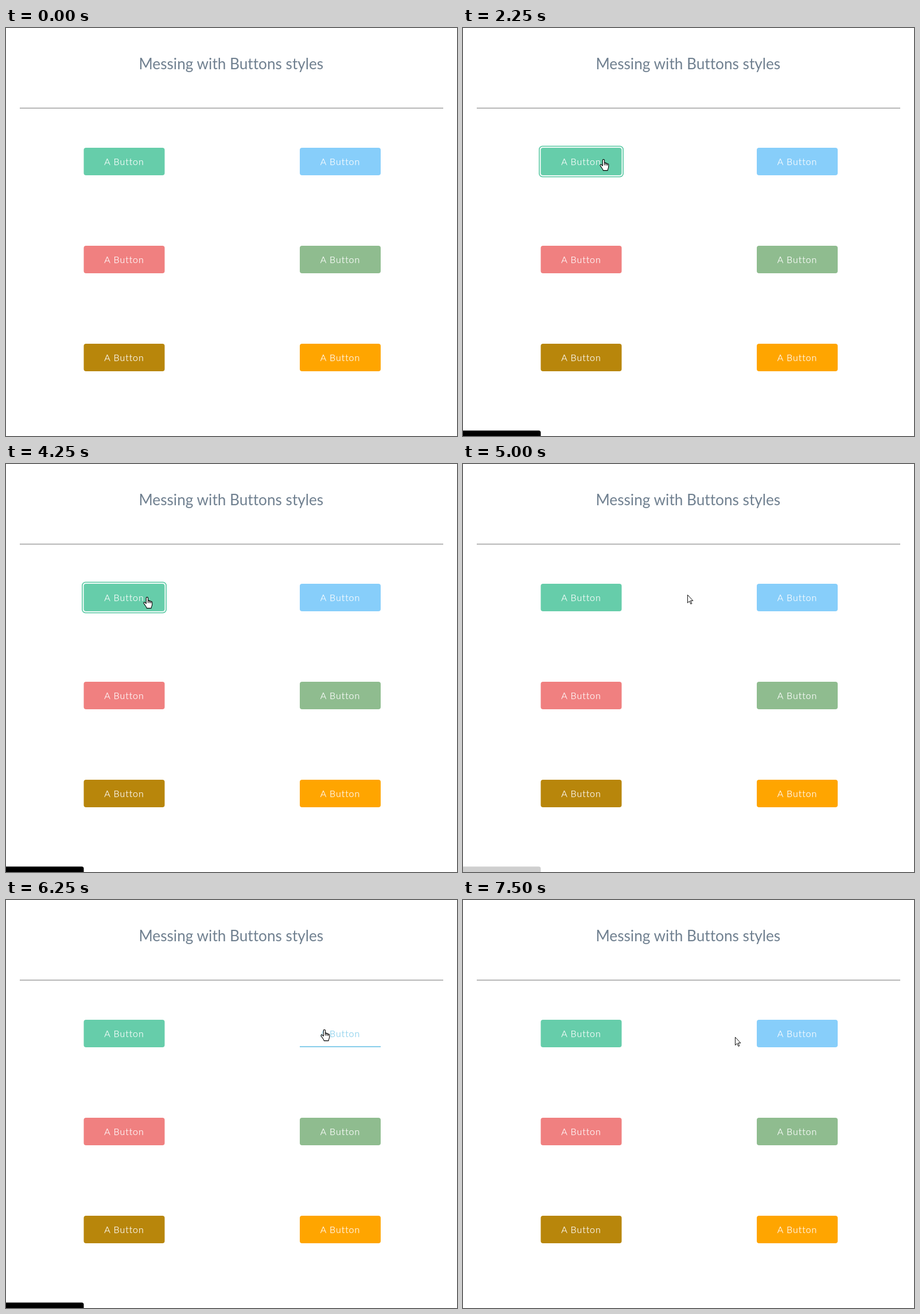
Write an HTML page that moves like this. It is 786x712 px and loops after 8000 ms.

```html
<!DOCTYPE html>
<html lang="en">
<head>
<meta charset="utf-8">
<title>Button styles</title>
<style>
  html, body { margin: 0; width: 100%; height: 100%; overflow: hidden; background: #fff; }
  svg { display: block; font-family: Lato, sans-serif; text-anchor: middle; font-variant-ligatures: none; }
  .label { font-size: 16px; font-weight: 300; letter-spacing: 1px; fill: currentColor; stroke: currentColor; stroke-width: .25; color: #fff; }
  .cursor { fill: #fff; stroke: #000; stroke-width: 1.1; stroke-linejoin: round; }
</style>
</head>
<body>
<svg width="786" height="712" viewBox="0 0 786 712">
  <text x="392.3" y="72" font-size="26.2" fill="#708090">Messing with Buttons styles</text>
  <path d="M24 139.5H762" stroke="#a4a4a4"/>
  <path d="M24 140.5H762" stroke="#ccc"/>
  <g id="ring">
    <rect x="132" y="205.5" width="148" height="55" rx="6.5" fill="#66cdaa"/>
    <rect x="133.75" y="207.25" width="144.5" height="51.5" rx="5" fill="#fff"/>
  </g>
  <g id="buttons"></g>
  <path id="underline" d="M512 256H653" stroke="#87ceeb" stroke-width="2"/>
  <path id="status" d="M0 702.5H132a3.5 3.5 0 0 1 3.5 3.5V712H0z"/>
  <g id="pointer" class="cursor">
    <path id="arrow" transform="scale(.87)" d="M.5.5v16l3.7-3.5 2.6 5.8 2.2-1-2.6-5.6h5z"/>
    <g id="hand">
      <path d="M-1.7 11.5V2a1.6 1.6 0 0 1 3.2 0V7a1.4 1.4 0 0 1 2.6 0v.6a1.3 1.3 0 0 1 2.4.3v.6a1.2 1.2 0 0 1 2.2.5V13c0 3-1.5 3.6-1.6 6.6H-.8c0-2.4-2-3.2-3.4-6l-1.6-2.4c-.9-1.5.7-2.8 2-1.5z"/>
      <path fill="none" d="M1.5 6.5v4M4.1 7v3.7M6.5 8v3"/>
    </g>
  </g>
</svg>
<script>
const $ = id => document.getElementById(id);
const STEP = 250, LOOP = 8000, W = 141, H = 48;
const colors = ['#66cdaa', '#87cefa', '#f08080', '#8fbc8f', '#b8860b', '#ffa500'];
const boxes = colors.map((color, i) => ({ color, x: 135.5 + i % 2 * 376.5, y: 209 + (i >> 1) * 171 }));

$('buttons').innerHTML = boxes.map(({ color, x, y }) =>
  `<rect x="${x}" y="${y}" width="${W}" height="${H}" rx="4" fill="${color}"/>
   <text class="label" x="${x + 70.5}" y="${y + 30}">A Button</text>`).join('');
const [, , blueBox, blueLabel] = $('buttons').children;

// where the pointer comes to rest: time, x, y
const stops = [
  [500, 367, 593], [1250, 293, 271], [2250, 245, 229], [3000, 335, 234], [3500, 278, 223],
  [4250, 246, 232], [5000, 391, 228], [5250, 490, 228], [6250, 555, 226], [7500, 474, 239]
];
const easeOut = k => 1 - (1 - k) ** 2;
const mix = (a, b, k) => a + (b - a) * k;

function position(t) {
  const next = stops.findIndex(s => s[0] > t);
  if (next < 0) return stops.at(-1).slice(1);
  const [t0, x0, y0] = stops[Math.max(0, next - 1)], [t1, x1, y1] = stops[next];
  const k = next ? easeOut((t - t0) / (t1 - t0)) : 0;
  return [mix(x0, x1, k), mix(y0, y1, k)];
}

// button under the pointer, or -1
function hovered(t) {
  const [px, py] = position(t), pad = 2;
  return boxes.findIndex(({ x, y }) =>
    px > x - pad && px < x + W + pad && py > y - pad && py < y + H + pad);
}

// hover style lags behind the pointer by up to two steps
const level = (i, t) => [1, 2].filter(n => hovered(t - n * STEP) === i).length / 2;

function statusAlpha(t) {
  if (hovered(t - 2 * STEP) >= 0) return 1;
  return hovered(t - 3 * STEP) >= 0 ? 0.19 : 0;
}

function show(id, visible) {
  $(id).style.display = visible ? '' : 'none';
}

function draw(now) {
  const t = Math.floor(now % LOOP / STEP) * STEP;
  const over = hovered(t) >= 0;
  show('pointer', t >= stops[0][0]);
  show('arrow', !over);
  show('hand', over);
  $('pointer').setAttribute('transform', `translate(${position(t)})`);

  $('ring').style.opacity = level(0, t);
  $('status').style.opacity = statusAlpha(t);

  const k = level(1, t);
  blueBox.style.opacity = 1 - k;
  $('underline').style.opacity = k;
  blueLabel.style.color = `rgb(${mix(255, 135, k)}, ${mix(255, 206, k)}, ${mix(255, 235, k)})`;
}

const start = performance.now();
function tick() {
  draw(performance.now() - start);
  requestAnimationFrame(tick);
}
tick();
</script>
</body>
</html>
```
